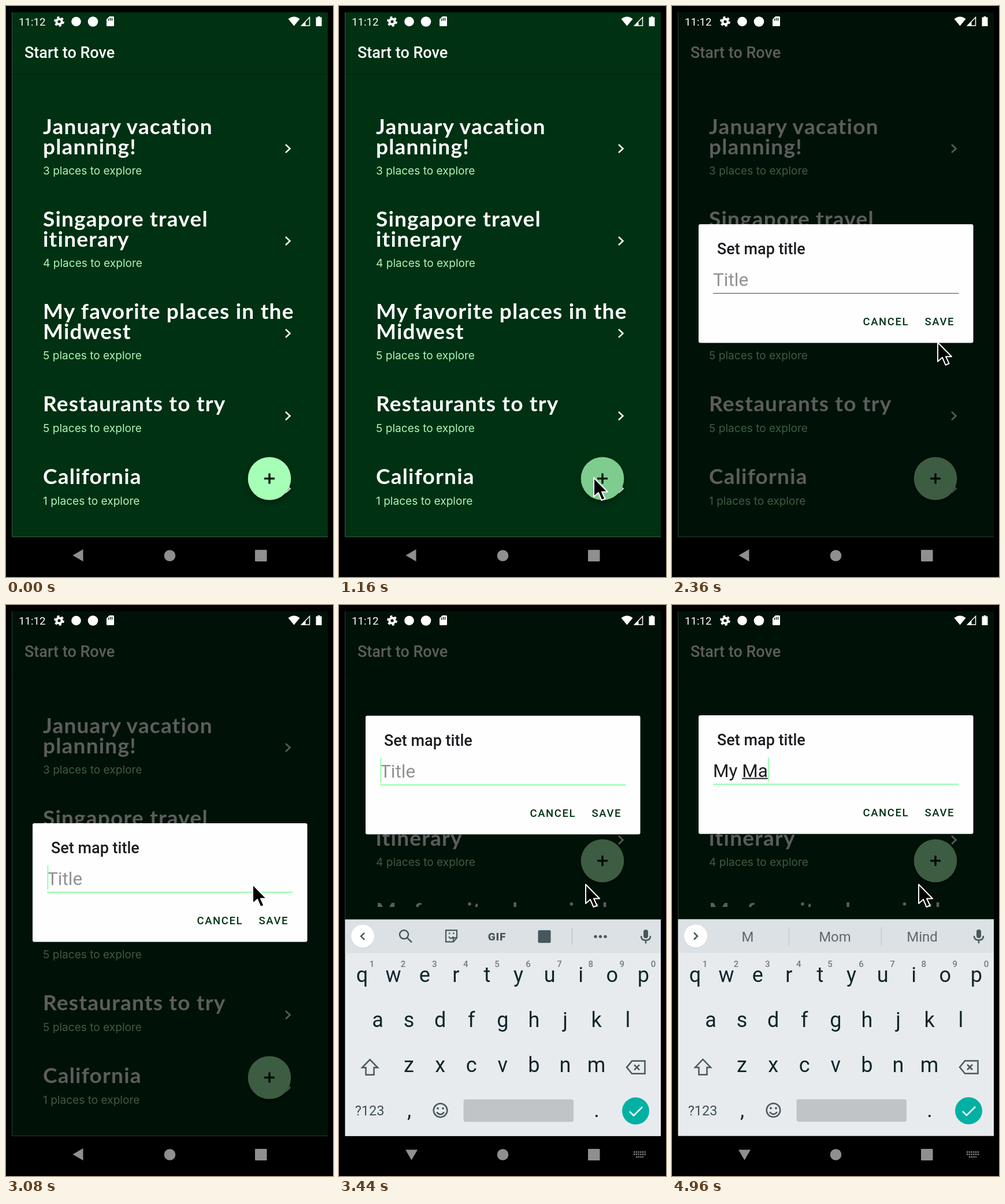
These frames come from a looping animation (566x989 px, 5000 ms). An HTML page:

```html
<!DOCTYPE html>
<html lang="en">
<head>
<meta charset="utf-8">
<title>Map list</title>
<style>
html, body { margin: 0; width: 100%; height: 100%; overflow: hidden; background: #000; }
svg { display: block; width: 100vw; height: 100vh; }
text { font-family: Roboto, sans-serif; white-space: pre; }
.title { font: 700 37px Lato, sans-serif; letter-spacing: 1.2px; fill: #fff; }
.sub { font: 400 19.1px Inter, sans-serif; fill: #a9f8b5; }
.head { font-size: 27px; font-weight: 500; }
.field { font-size: 31.5px; fill: #1c1b1f; }
.btn { font-size: 18.5px; font-weight: 500; letter-spacing: 1.6px; fill: #003314; }
.key { font-size: 36px; fill: #10262b; text-anchor: middle; }
.num { font-size: 15px; font-weight: 500; fill: #707a7e; text-anchor: middle; }
.word { font-size: 24px; fill: #5c696d; text-anchor: middle; }
.line { fill: none; stroke: #46585c; stroke-width: 2.5; }
</style>
</head>
<body>
<svg viewBox="0 0 566 989" preserveAspectRatio="none">
  <defs>
    <clipPath id="listClip"><rect id="listBox" x="10" y="118" width="547" height="802"/></clipPath>
    <clipPath id="screenClip"><rect x="10.5" y="11" width="546.5" height="973"/></clipPath>
  </defs>
  <rect width="566" height="989"/>

  <rect x="10.5" y="11" width="546.5" height="908.5" fill="#fff"/>
  <rect id="page" x="10.5" y="11" width="546.5" height="908.5" fill="#003113"/>
  <rect x="10.5" y="117" width="546.5" height="2" opacity=".16"/>
  <text class="head" x="32" y="90" fill="#fff">Start to Rove</text>
  <g id="list" clip-path="url(#listClip)"></g>
  <g id="fab">
    <circle r="37.3" fill="#a6ffb7" style="filter:drop-shadow(0 4px 4px rgba(0,0,0,.4))"/>
    <circle id="ripple" r="37.3" fill="#003113"/>
    <path d="M-9 0H9M0-9V9" stroke="#06210d" stroke-width="3.6"/>
  </g>
  <rect id="scrim" x="10.5" y="11" width="546.5" height="908.5"/>

  <g fill="#fff">
    <text x="22" y="34" font-size="18.7">11:12</text>
    <circle cx="92" cy="27" r="4.6" fill="none" stroke="#fff" stroke-width="4"/>
    <circle cx="92" cy="27" r="7.4" fill="none" stroke="#fff" stroke-width="3" stroke-dasharray="3.9 3.85"/>
    <circle cx="121.5" cy="27" r="8.3"/>
    <circle cx="150.5" cy="27" r="8.8"/>
    <path d="M179 18H185.500Q187 18 187 19.500V33.500Q187 35 185.500 35H175.500Q174 35 174 33.500V23Z"/>
    <path d="M177.500 22V25.500M180.500 20.500V25.500M183.500 20.500V25.500" stroke="#00200c" stroke-width="1.4"/>
    <path d="M498.500 34.500L488.500 22.500Q498.500 14.500 508.500 22.500Z"/>
    <path d="M525.500 19.500V34H511.500Z" fill="none" stroke="#fff" stroke-width="1.5"/>
    <path d="M518.500 27V34.500H511Z"/>
    <path d="M539.500 18H543.500V19.500H546.500V35H536.500V19.500H539.500Z"/>
  </g>

  <g id="dialog">
    <rect x="46" width="475.5" height="205.5" rx="3" fill="#fffeff"/>
    <text class="head" x="78" y="52" fill="#1c1b1f">Set map title</text>
    <text id="hint" class="field" x="71" y="107" style="fill:#929193">Title</text>
    <text id="typed" class="field" x="71" y="107"></text>
    <path id="wordLine" stroke="#1c1b1f" stroke-width="1.8"/>
    <path id="baseLine" d="M71 119.700H496.500"/>
    <rect id="caret" y="73" width="2.5" height="42" fill="#a6ffb7"/>
    <text class="btn" x="330.500" y="175">CANCEL</text>
    <text class="btn" x="437.500" y="175">SAVE</text>
  </g>

  <g clip-path="url(#screenClip)"><g id="keyboard">
    <rect x="10.500" y="544.500" width="546.500" height="375" fill="#e8ebee"/>
    <rect x="10.500" y="544.500" width="546.500" height="58" fill="#dce1e5"/>
    <g id="tools">
      <g class="line">
        <circle cx="112.500" cy="570.500" r="7.500"/>
        <path d="M118 576L126 584"/>
        <path d="M185 563H204V576L198 583H185ZM198 583V576H204M190 574Q194 580 198 574" stroke-width="2.200"/>
        <path d="M190 568.500h2.500M197 568.500h2.500"/>
        <path d="M403.500 559V588" stroke="#bcc3c7" stroke-width="1.500"/>
      </g>
      <text x="273.500" y="580.500" font-size="19" font-weight="900" letter-spacing=".8" text-anchor="middle" fill="#46585c">GIF</text>
      <rect x="344.500" y="563" width="22" height="22" rx="2" fill="#46585c"/>
      <g fill="#46585c"><circle cx="444" cy="574" r="2.700"/><circle cx="452.500" cy="574" r="2.700"/><circle cx="461" cy="574" r="2.700"/></g>
    </g>
    <g id="words">
      <path d="M202.500 558V590M362.500 558V590" stroke="#c3cacd" stroke-width="1.500"/>
      <text class="word" x="131" y="583">M</text>
      <text class="word" x="282" y="583">Mom</text>
      <text class="word" x="433" y="583">Mind</text>
    </g>
    <circle cx="41" cy="574.500" r="20" fill="#000" opacity=".12"/>
    <circle cx="41" cy="573.500" r="20" fill="#fff"/>
    <path id="toggle" class="line" d="M-3-6L3 0L-3 6"/>
    <rect x="527" y="562" width="8" height="15" rx="4" fill="#46585c"/>
    <path class="line" stroke-width="2" d="M523 573Q523 580.500 531 580.500T539 573M531 580V586"/>
    <g id="keys"></g>
    <path class="line" d="M53.500 787L67 801H60.500V813.500H46.500V801H40Z"/>
    <path class="line" d="M507 789.500H529.500V811.500H507L498 800.500ZM511 796L520 805M520 796L511 805"/>
    <text x="53" y="884" font-size="23.500" text-anchor="middle" fill="#3d5257">?123</text>
    <circle class="line" cx="175.500" cy="875" r="11.800"/>
    <path class="line" d="M169 878Q175.500 886 182 878"/>
    <g fill="#46585c"><circle cx="171" cy="871.500" r="1.900"/><circle cx="180" cy="871.500" r="1.900"/></g>
    <rect x="215.500" y="856" width="190.500" height="39" rx="4" fill="#c1c4c7"/>
    <circle cx="513.500" cy="876" r="23.500" fill="#02b1a3"/>
    <path d="M503 877L510 884L525 869" fill="none" stroke="#fff" stroke-width="2.600"/>
  </g></g>

  <g fill="#fff" fill-opacity=".56">
    <path id="back" d="M-10 0L8-10.500V10.500Z"/>
    <circle cx="283.500" cy="952" r="9.800"/>
    <rect x="431" y="942" width="20.500" height="20" rx="1"/>
    <path id="switcher" d="M510 947.500H531M510 951.500H531M514 956H527" fill="none" stroke="#fff" stroke-opacity=".52" stroke-width="2.400" stroke-dasharray="2.400 1.300"/>
  </g>
  <path id="mouse" d="M0 0V33L8 26L13.500 39L19.500 36.500L14 24.500H24Z" fill="#000" stroke="#fff" stroke-width="2" stroke-linejoin="round"/>
</svg>

<script>
const LOOP = 5000;
const $ = id => document.getElementById(id);
const set = (id, attrs) => { for (const k in attrs) $(id).setAttribute(k, attrs[k]); };
const show = (id, on) => set(id, { display: on ? 'inline' : 'none' });
const clamp = v => Math.max(0, Math.min(1, v));
const ramp = (t, from, to) => clamp((t - from) / (to - from));
const easeOut = p => 1 - (1 - p) ** 3;
const smooth = p => p * p * (3 - 2 * p);
const label = (cls, x, y, s) => `<text class="${cls}" x="${x}" y="${y}">${s}</text>`;

const maps = [
  [['January vacation', 'planning!'], 3, 222, 247],
  [['Singapore travel', 'itinerary'], 4, 382, 407],
  [['My favorite places in the', 'Midwest'], 5, 542, 567],
  [['Restaurants to try'], 5, 702, 710],
  [['California'], 1, 828, 836]
];
$('list').innerHTML = maps.map(([lines, count, y, arrowY]) =>
  lines.map((s, i) => label('title', 64, y + i * 34.5, s)).join('') +
  label('sub', 64, y + lines.length * 34.5 + 1, `${count} places to explore`) +
  `<path d="M484 ${arrowY - 7}l7.5 7l-7.5 7" fill="none" stroke="#fff" stroke-width="2.5"/>`
).join('');

const rows = [['qwertyuiop', 40, 653], ['asdfghjkl', 67, 731], ['zxcvbnm', 121, 809], [',', 121.5, 887], ['.', 446, 887]];
$('keys').innerHTML = rows.map(([chars, x, y], r) => [...chars].map((c, i) =>
  label('key', x + i * 54.1, y, c) +
  (r ? '' : label('num', 57 + i * 54.1, 627, (i + 1) % 10))).join('')).join('');

// time, x, y of the pointer tip
const track = [
  [760, 478, 752], [1000, 441, 817], [1640, 441, 817], [2120, 441, 678],
  [2360, 460, 583], [2600, 448, 512], [2800, 427, 484], [LOOP, 427, 484]
];
function pointer(t) {
  const i = track.findIndex(p => p[0] > t);
  const [t0, x0, y0] = track[i - 1], [t1, x1, y1] = track[i];
  const p = (t - t0) / (t1 - t0);
  return [x0 + (x1 - x0) * p, y0 + (y1 - y0) * p];
}

const FOCUS = 2960, RESIZE = 3170, SUGGEST = 4160;
const phrase = 'My Ma';
const strokes = [4080, 4280, 4480, 4720, 4950];

function drawField(t) {
  const count = strokes.filter(s => s <= t).length;
  const text = phrase.slice(0, count);
  const typed = $('typed');
  if (typed.textContent !== text) typed.textContent = text;
  const end = count ? typed.getComputedTextLength() : 0;
  const start = text.lastIndexOf(' ') + 1;
  const head = count && start ? typed.getSubStringLength(0, start) : 0;
  show('hint', !count);
  show('wordLine', count && start < count);
  set('wordLine', { d: `M${71 + head} 109.5H${71 + end}` });

  const focused = t >= FOCUS;
  set('baseLine', { stroke: focused ? '#a6ffb7' : '#5b6165', 'stroke-width': focused ? 2.8 : 1.2 });
  const since = t - (count ? strokes[count - 1] : FOCUS);
  show('caret', focused && since % 1000 < 500);
  set('caret', { x: 71 + end });
}

function draw(t) {
  const open = ramp(t, 1220, 1430);
  const ime = easeOut(ramp(t, RESIZE, RESIZE + 325));
  const resized = t >= RESIZE;

  set('page', { height: resized ? 533.5 : 908.5 });
  set('listBox', { height: resized ? 405 : 802 });
  set('fab', { transform: `translate(456 ${resized ? 443 : 818.5})` });
  set('ripple', { opacity: .24 * ramp(t, 1040, 1140) * (1 - ramp(t, 1240, 1640)) });
  set('scrim', { opacity: .635 * open });

  const scale = .9 + .1 * easeOut(open);
  const top = 378 - 187 * ime;
  show('dialog', open > 0);
  set('dialog', {
    opacity: open,
    transform: `translate(${284 * (1 - scale)} ${top + 103 * (1 - scale)}) scale(${scale})`
  });
  drawField(t);

  const suggesting = t >= SUGGEST;
  const tools = suggesting ? 0 : smooth(ramp(t, 3320, 3430));
  show('keyboard', resized);
  set('keyboard', { opacity: clamp(ime * 1.3), transform: `translate(0 ${75 * (1 - ime)})` });
  set('tools', { opacity: tools });
  show('words', suggesting);
  set('toggle', { transform: `translate(41 573.5) scale(${tools > .5 ? -1 : 1} 1)` });

  set('back', { transform: `translate(125.5 951.5) rotate(${-90 * ime})` });
  set('switcher', { opacity: ime });

  show('mouse', t >= track[0][0]);
  if (t >= track[0][0]) set('mouse', { transform: `translate(${pointer(t)})` });
}

function frame() {
  draw(performance.now() % LOOP);
  requestAnimationFrame(frame);
}
frame();
</script>
</body>
</html>
```
